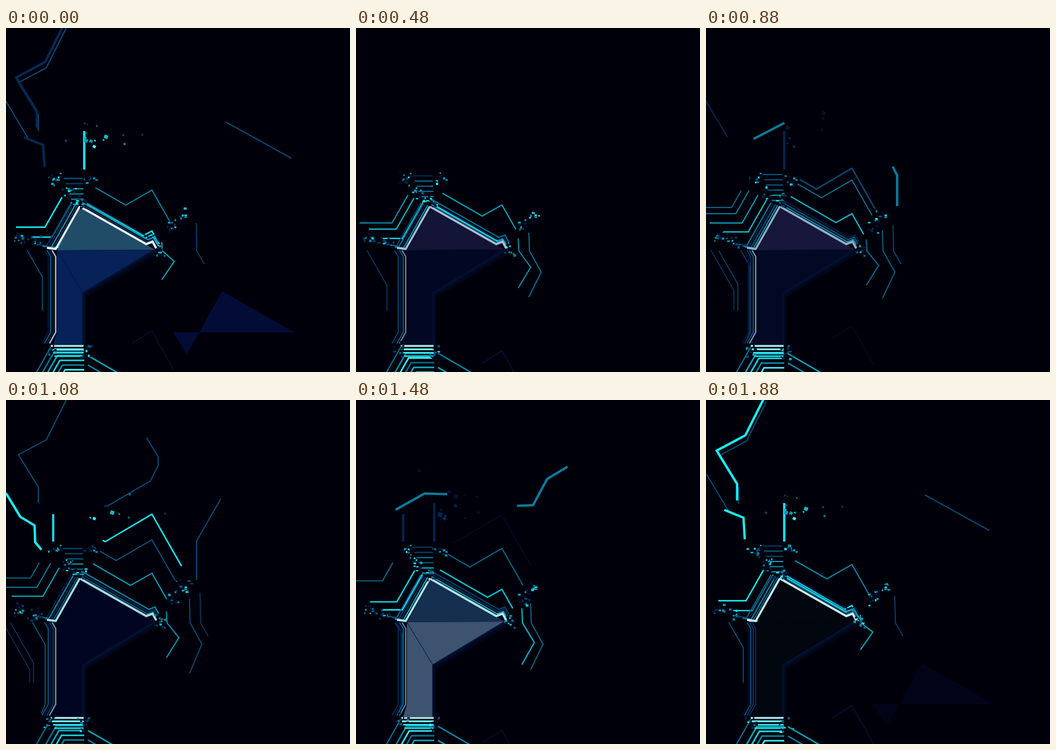
An HTML page with a canvas for the animation above (1.92 s loop, 554x554 px).

```html
<!DOCTYPE html>
<html lang="en">
<head>
<meta charset="utf-8">
<title>Circuit pulse</title>
<style>
html, body { margin: 0; width: 100%; height: 100%; overflow: hidden; background: #00000b; }
canvas { display: block; width: 554px; height: 554px; }
</style>
</head>
<body>
<canvas id="c" width="554" height="554"></canvas>
<script>
const ctx = document.getElementById('c').getContext('2d');
const LOOP = 1920, STEP = 40, FADE = 60;
const BEATS = [0, 280, 720, 1080, 1320, 1640, 1880];

const hex = s => [0, 2, 4].map(i => parseInt(s.substr(i, 2), 16));
const colors = s => s.split(' ').map(hex);
const RAMP = colors('00000b 031842 074c76 0c94ae 18eef4 e0f4fa');
const BG = RAMP[0];

const mix = (a, b, k) => a.map((v, i) => v + (b[i] - v) * k);
const rgb = c => `rgb(${c.map(Math.round).join()})`;
const clamp = (v, lo, hi) => Math.min(hi, Math.max(lo, v));
const frac = v => v - Math.floor(v);
const hash = n => frac(Math.sin(n * 127.1 + 11.7) * 43758.5453);
const path = s => s.split(' ').map(p => p.split(',').map(Number));
const shift = (pts, dx, dy) => pts.map(([x, y]) => [x + dx, y + dy]);

function ramp(level) {
  const x = clamp(level, 0, 1) * 5, i = Math.min(4, Math.floor(x));
  return mix(RAMP[i], RAMP[i + 1], x - i);
}
function trace(pts) {
  ctx.beginPath();
  pts.forEach(([x, y], i) => i ? ctx.lineTo(x, y) : ctx.moveTo(x, y));
}
function stroke(pts, color, width) {
  trace(pts);
  ctx.strokeStyle = rgb(color);
  ctx.lineWidth = width;
  ctx.stroke();
}
function line(pts, level, width) {
  if (level > .02) stroke(pts, ramp(level), width);
}
function fill(pts, color) {
  trace(pts);
  ctx.fillStyle = rgb(color);
  ctx.fill();
}

// Colour between the beats, wrapping at the end of the loop
function keyed(t, vals) {
  let i = BEATS.length - 1;
  while (BEATS[i] > t) i--;
  const next = BEATS[i + 1] || LOOP;
  return mix(vals[i], vals[(i + 1) % vals.length], (t - BEATS[i]) / (next - BEATS[i]));
}

// Call fn with the time and fade of each loop pass that is visible
function during(t, from, to, fn) {
  for (const n of [t - LOOP, t, t + LOOP]) {
    const e = Math.min(1, (n - from) / FADE + 1, (to - n) / FADE + 1);
    if (e > 0) fn(n, e);
  }
}

/* Contours that travel away from the core; each wave is [birth, first age, last age] */
const families = [
  {
    start: 340, speed: -.1, gain: 1,
    waves: [[1130, 60, 1200], [-70, 20, 1510], [470, 0, 1300], [-260, 870, 1110], [-480, 1460, 1640], [1790, 0, 290]],
    shape(p) {
      const d = p - 231, vx = 180 + d * .43, vy = 263 + d * .74;
      const x0 = Math.min(vx - 4, 150 - d * .2), x1 = 271 - d * .25;
      return [[x0, vy - (vx - x0) * .575], [vx, vy], [235, p], [x1, p + (x1 - 235) * 1.75]];
    }
  },
  {
    start: 352, speed: -.062, gain: 1,
    waves: [[268, 0, 1150], [26, -80, 1100], [-135, 300, 1040], [500, 200, 1240],
      [1046, 180, 430], [1253, 50, 490], [1416, 360, 660], [1674, 30, 600]],
    shape(q) {
      const x = 65 + (q - 324) * .68, top = 262 + Math.max(0, (q - 300) * .5);
      return [[Math.max(0, (q - 310) * 1.5), q], [x, q], [x + (q - top) * .57, top]];
    }
  },
  {
    start: 240, speed: .057, gain: .85,
    waves: [[757, 240, 1220], [106, 50, 1020], [-192, 80, 1340], [1004, 180, 600], [562, 0, 300]],
    shape(r) {
      const d = r - 250, tip = Math.min(393, 375 + d * .9);
      const arm = [[r, 345 - d * .55], [r + 1, 359]];
      return r > 296 ? [...arm, [r + 13, 380]]
        : [...arm, [r + 20, tip], [r, tip + 29 + d * .4]];
    }
  },
  {
    start: 76, speed: -.035, gain: .65,
    waves: [[1423, 80, 880], [-263, 430, 720], [177, 390, 980], [-6, 700, 1160], [709, 190, 690]],
    shape(s) {
      const y = 402 + (58 - s) * 1.6;
      const leg = [[s - (y - 358) * .57, 358], [s, y]];
      return s > 62 ? [...leg, [s, 490], [s - 6, 505]] : [...leg, [s, 455]];
    }
  },
  {
    start: 550, speed: -.1, gain: .28,
    waves: [[180, 0, 680], [1300, 200, 660]],
    shape: p => [[203, p + 20], [235, p], [270, p + 62]]
  }
];

function drawWaves(t) {
  for (const { start, speed, gain, waves, shape } of families)
    for (const [birth, first, last] of waves)
      during(t, birth + first, birth + last, (n, e) => {
        const age = n - birth;
        const level = gain * (last - first < 460 ? .78 : .8 - age * .0003);
        line(shape(start + age * speed), level * e, 1.2 + 2 * level * level);
      });
}

/* Outer traces, drifting away from the core around their moment */
const spine = path('97,0 65,64 20,88 52,140 52,166');
const west = path('0,150 23,188 46,202 47,229 57,241');
const slant = path('0,118 37,180');
const bold = [
  [280, path('122,0 122,12 233,80 240,92 233,104 152,153')],
  [720, path('78,183 126,158')],
  [720, path('295,226 302,240 302,288')],
  [1080, west],
  [1320, path('255,175 280,174 302,133 334,114')],
  [1640, path('62,172 110,145 148,146')],
  [1740, spine],
  [1740, path('32,181 62,193 64,227')]
];
const faint = [
  [0, spine], [0, slant], [280, west], [720, slant], [1080, spine],
  [-20, path('353,152 458,210')],
  [280, path('465,177 479,201 479,225 472,238 450,250 324,251 324,300')],
  [1080, path('346,159 307,227 307,290')],
  [1200, path('229,54 248,86 248,101 235,126 163,168')]
];

function drawTraces(t) {
  const show = (list, level, width) => list.forEach(([at, pts]) =>
    during(t, at - 140, at + 140, (n, e) => {
      const k = 1 + (n - at) * .0002;
      line(pts.map(([x, y]) => [120 + (x - 120) * k, 320 + (y - 320) * k]), level * e, width);
    }));
  show(faint, .4, 1.9);
  show(bold, .8, 3.8);
}

// On every beat: a stub on alternating sides and a few sparks
function drawBeats(t) {
  BEATS.forEach((at, i) => during(t, at - 120, at + 120, (n, e) => {
    const x = i % 2 ? 76 : 126;
    line([[x, i % 2 ? 184 : 166], [x, 228]], .76 * e, 3.6);
    for (let j = 0; j < 8; j++) {
      const s = i * 31 + j * 5, size = 2 + 5 * hash(s) ** 2;
      const sx = 140 + 220 * (hash(s + 1) - .4) * j / 8, sy = 190 - 90 * hash(s + 2) * j / 8;
      line([[sx, sy], [sx + size, sy + 2]], (.85 - j * .08) * e, size);
    }
  }));
}

/* Large panels that flash up in the dark */
function drawPanels(t) {
  during(t, 1920, 1940, (n, e) => {
    const c = mix(BG, hex('020c36'), e);
    fill(path('348,424 464,490 311,490'), c);
    fill(path('269,490 311,490 291,525'), c);
  });
  during(t, 1280, 1360, (n, e) => {
    const panel = path('330,263 445,261 475,243 486,225 487,190 497,207 497,243 465,297 378,346 378,360 328,360');
    fill(panel, mix(BG, hex('042458'), e));
    line([panel[0], panel[8]], .12 * e, 1.5);
    line(shift(panel.slice(5, 9), 3, 6), .22 * e, 1.8);
  });
}

/* Core */
const APEX = [120, 288], EAST = [240, 357], WEST = [82, 358], NOTCH = [124, 427], FOOT = [124, 510];
const upper = colors('204c68 020520 282650 020522 26587c 020524 01060f');
const lower = colors('062258 02051e 030a28 020522 6597ab 170f34 01060f');
const edge = colors('e8f6fa c4eef4 7c86b4 a8dce6 8cd8e6 d4f4f8 c8f0f6');
const wallTone = colors('a4b6d4 5c6488 8088b0 5c90b4 98a4c4 104c78 082450');

function drawCore(t) {
  const low = keyed(t, lower), rim = keyed(t, edge), tone = keyed(t, wallTone);
  const inner = [EAST, NOTCH, FOOT];
  for (let k = 3; k >= 0; k--) line(shift(inner, k, k * 2), .1 - k * .02, 4);
  fill([APEX, EAST, WEST], keyed(t, upper));
  fill([WEST, EAST, NOTCH, FOOT, [76, 510], [82, 490]], low);
  line(inner, .14, 2.5);
  if (low[1] > 14) line([WEST, NOTCH], .18, 1);

  // Bands spreading from each edge, dimmer with distance
  const roof = path('120,288 226,348 236,344 242,355'), slope = path('119,287 80,356 66,354');
  const wall = path('74,358 80,368 80,490 70,508');
  for (let k = 4; k > 0; k--) {
    const pulse = .5 + .5 * Math.sin(6.283 * (t * 6 / LOOP - k * .37));
    const level = .3 + .4 * pulse - k * .04;
    if (k < 4) line(shift(roof, k * 1.3, -k * 3.6), level, 2);
    line(shift(slope, -k * 3.6, -k * 1.4), level, 2);
    if (k < 4) line(shift(wall, -k * 4, 0), level * .75, 1.8);
  }
  stroke(roof, rim, 3.6);
  stroke(slope, rim, 3.4);
  stroke(wall, tone, 2.4);
}

/* Bars above the apex and below the foot */
function drawStacks(t) {
  const u = t / LOOP;
  for (let i = 0; i < 6; i++) {
    const k = frac(u + i / 6), y = 284 - 50 * k;
    line([[108 - 18 * k, y], [126 - 3 * k, y]], .8 - .35 * k - .2 * hash(i), 1.9);
  }
  for (let i = 0; i < 5; i++) {
    const b = 520 + 38 * frac(u * 2 + i / 5), d = 560 - b;
    const l = 74 + (b - 512) * .55, level = .45 + .4 * hash(i + 20);
    line([[l - d * .57, 560], [l, b], [126, b]], level, 2.6);
    if (i % 2) line([[132, b], [132 + d * 1.73, b + d]], level, 2.4);
  }
  for (let i = 0; i < 4; i++)
    line([[72 + i * 2, 512 + i * 5.5], [125, 512 + i * 5.5]], .95 - i * .06, 3 - i * .2);
  line([[72, 514], [46, 560]], .5, 2);
}

/* Flickering dust at the joints, with dark grains that break up the lines */
const joints = path('78,244 132,243 98,264 119,278 22,336 46,345 268,318 284,300 246,354 128,522 70,516');
function drawDust(t) {
  const beat = Math.floor(t / 80);
  joints.forEach(([x, y], j) => {
    for (let i = 0; i < 16; i++) {
      const s = j * 61 + i * 7.3 + beat * .37 * (i % 3);
      const px = x + (hash(s) + hash(s + 1) - 1) * 14;
      const py = y + (hash(s + 2) + hash(s + 3) - 1) * 13;
      ctx.fillStyle = rgb(ramp(.85 * hash(s + 4) ** 1.6));
      ctx.fillRect(px, py, 2 + 3 * hash(s + 5), 2 + 2 * hash(s + 6));
    }
  });
}

function draw(t) {
  ctx.fillStyle = rgb(BG);
  ctx.fillRect(0, 0, 554, 554);
  [drawPanels, drawTraces, drawBeats, drawWaves, drawCore, drawStacks, drawDust].forEach(f => f(t));
}

const start = performance.now();
function tick() {
  const t = (performance.now() - start) % LOOP;
  draw(Math.floor(t / STEP) * STEP);
  requestAnimationFrame(tick);
}
tick();
</script>
</body>
</html>
```
